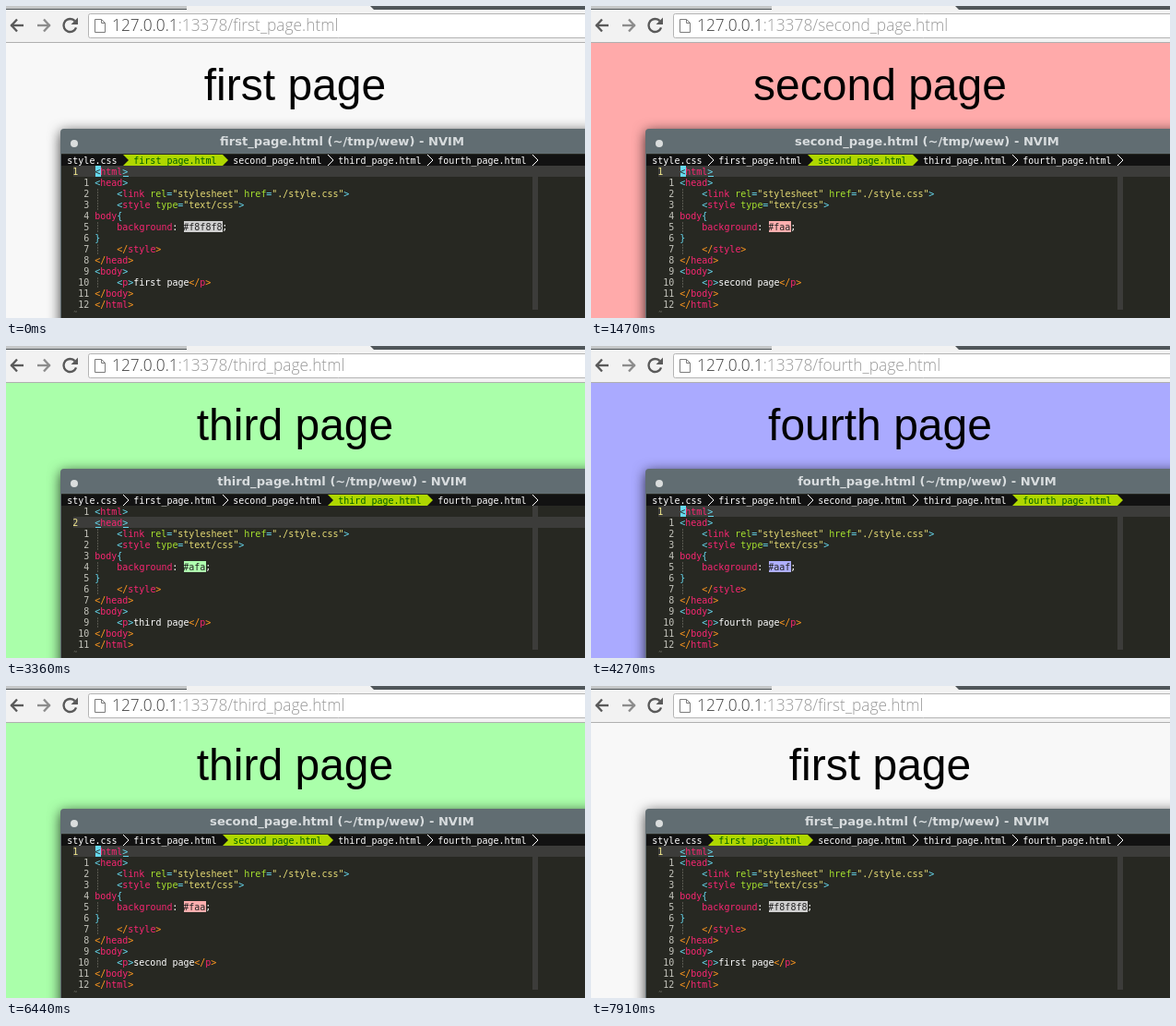
Animation of 628 by 338 pixels, one loop 8 s. Source, as an HTML page with a canvas:

```html
<!DOCTYPE html>
<html lang="en">
<head>
<meta charset="utf-8">
<title>Browser following the editor</title>
<style>
  html, body { margin: 0; width: 100%; height: 100%; overflow: hidden; }
  canvas { display: block; }
</style>
</head>
<body>
<canvas id="stage" width="628" height="338"></canvas>
<script>
const ctx = document.getElementById('stage').getContext('2d');
const W = 628, H = 338, LOOP = 8000, STEP = 70;

const PAGES = [
  { name: 'first', bg: '#f8f8f8', swatch: '#d0d0d0', line: 0 },
  { name: 'second', bg: '#faa', swatch: '#ffafaf', line: 0 },
  { name: 'third', bg: '#afa', swatch: '#afffaf', line: 1 },
  { name: 'fourth', bg: '#aaf', swatch: '#afafff', line: 0 }
];

// Each visit: editor switches, browser starts loading, address changes,
// page appears; recheck is when the stop button flashes once more.
const VISITS = [
  { page: 0, edit: 0, start: 0, url: 0, load: 0 },
  { page: 1, edit: 1190, start: 1260, url: 1330, load: 1470 },
  { page: 2, edit: 2660, start: 2730, url: 2730, load: 2940, recheck: 3010 },
  { page: 3, edit: 3990, start: 4060, url: 4060, load: 4270, recheck: 4340 },
  { page: 2, edit: 5320, start: 5390, url: 5390, load: 5600, recheck: 5670 },
  { page: 1, edit: 6440, start: 6510, url: 6580, load: 6720, recheck: 6860 },
  { page: 0, edit: 7280, start: 7350, url: 7350, load: 7490, recheck: 7630 }
];
const CURSOR_OFF = [[280, 840], [1890, 2520], [3360, 3990], [5110, 5320], [6020, 6440], [7910, LOOP]];

const within = (t, from, to) => t >= from && t < to;
const pageAt = (t, event) => PAGES[VISITS.filter(v => v[event] <= t).pop().page];
const isLoading = t => VISITS.some(v =>
  within(t, v.start, v.load) || within(t, v.recheck, v.recheck + STEP));

// ---- drawing helpers ----
function rect(x, y, w, h, color) {
  ctx.fillStyle = color;
  ctx.fillRect(x, y, w, h);
}

function path(points, { fill, stroke, width = 1, close = false }) {
  ctx.beginPath();
  points.forEach(([x, y]) => ctx.lineTo(x, y));
  if (close) ctx.closePath();
  if (fill) { ctx.fillStyle = fill; ctx.fill(); }
  if (stroke) { ctx.strokeStyle = stroke; ctx.lineWidth = width; ctx.stroke(); }
}

function text(str, x, y, font, color, align = 'left') {
  ctx.font = font;
  ctx.fillStyle = color;
  ctx.textAlign = align;
  ctx.fillText(str, x, y);
  return ctx.measureText(str).width;
}

// ---- browser ----
const ICON = '#5a5a5a', TOOLBAR = '#f2f2f2', FRAME = '#50565a';

function arrow(tip, dir, color) {
  path([[tip, 21], [tip + 14 * dir, 21]], { stroke: color, width: 2.4 });
  path([[tip + 7 * dir, 14.5], [tip + dir, 21], [tip + 7 * dir, 27.5]], { stroke: color, width: 2.4 });
}

function octagon(radius, style) {
  const points = Array.from({ length: 8 }, (_, i) => {
    const a = (i + 0.5) * Math.PI / 4;
    return [70 + radius * Math.cos(a), 21 + radius * Math.sin(a)];
  });
  path(points, { ...style, close: true });
}

function reloadIcon() {
  ctx.beginPath();
  ctx.arc(69.5, 21, 7, 0.35, 5.5);
  ctx.strokeStyle = ICON;
  ctx.lineWidth = 2.4;
  ctx.stroke();
  path([[78, 12.5], [78, 20], [70.5, 20]], { fill: ICON });
}

function drawBrowser(t) {
  const page = pageAt(t, 'load');
  rect(0, 0, W, H, page.bg);
  text(`${page.name} page`, 313.5, 102, '48px "Liberation Sans", sans-serif', '#000', 'center');

  rect(0, 0, W, 39, TOOLBAR);
  rect(0, 0, W, 4, FRAME);
  rect(0, 0, 196, 3, '#c4c6c7');
  path([[196, 4], [196, 0], [395, 0], [399, 4]], { fill: TOOLBAR });
  rect(0, 39, W, 1, '#b0b0b0');

  ctx.beginPath();
  ctx.roundRect(89.5, 8.5, 560, 26, 2);
  ctx.fillStyle = '#fff';
  ctx.fill();
  ctx.strokeStyle = '#b4b4b4';
  ctx.lineWidth = 1;
  ctx.stroke();

  arrow(5, 1, ICON);
  arrow(48, -1, '#8c8c8c');
  if (isLoading(t)) {
    octagon(8.2, { stroke: ICON, width: 1.6 });
    octagon(6, { fill: ICON });
  } else {
    reloadIcon();
  }

  path([[96.5, 14.5], [103.5, 14.5], [107.5, 18.5], [107.5, 28.5], [96.5, 28.5]],
    { fill: '#fff', stroke: '#7c7c7c', close: true });
  path([[103.5, 14.5], [103.5, 18.5], [107.5, 18.5]], { stroke: '#7c7c7c' });

  const font = '300 17.33px "Open Sans", sans-serif';
  const hostWidth = text('127.0.0.1', 115, 27, font, '#444');
  text(`:13378/${pageAt(t, 'url').name}_page.html`, 115 + hostWidth, 27, font, '#999');
}

// ---- editor ----
const CELL_W = 6, CELL_H = 12, LEFT = 61, TOP = 161, NUMBER_COL = 2, CODE_COL = 6;
const MONO = '10px "DejaVu Sans Mono", monospace';
const BG = '#272822', HIGHLIGHT = '#3c3c3a', TAB_BG = '#121212', LIME = '#afd700';
const CYAN = '#66d9ef', PINK = '#f92672', ORANGE = '#fd971f', GREEN = '#a6e22e';
const YELLOW = '#e6db74', WHITE = '#fff', DIM = '#66665e';

const colX = col => LEFT + col * CELL_W;
const rowY = row => TOP + row * CELL_H;
const put = (str, col, row, color) => text(str, colX(col) - 0.7, rowY(row) + 10, MONO, color);

const open = (tag, ...attrs) => [[CYAN, '<'], [PINK, tag], ...attrs.flat(), [CYAN, '>']];
const close = tag => [[ORANGE, '</'], [PINK, tag], [ORANGE, '>']];
const attr = (name, value) => [[GREEN, ` ${name}`], [CYAN, '='], [YELLOW, `"${value}"`]];
const indent = parts => [[DIM, '┊'], [WHITE, '   '], ...parts];

const codeFor = page => [
  open('html'),
  open('head'),
  indent(open('link', attr('rel', 'stylesheet'), attr('href', './style.css'))),
  indent(open('style', attr('type', 'text/css'))),
  [[PINK, 'body'], [CYAN, '{']],
  indent([[PINK, 'background'], [WHITE, ': '], ['#222', page.bg, page.swatch], [WHITE, ';']]),
  [[CYAN, '}']],
  indent(close('style')),
  close('head'),
  open('body'),
  indent([...open('p'), [WHITE, `${page.name} page`], ...close('p')]),
  close('body'),
  close('html')
];

function drawTabs(page) {
  rect(60, TOP, W - 60, CELL_H, TAB_BG);
  const active = `${page.name}_page.html`;
  const tabs = ['style.css', ...PAGES.map(p => `${p.name}_page.html`)];
  let col = 0;
  tabs.forEach((tab, i) => {
    const isActive = tab === active, beforeActive = tabs[i + 1] === active;
    const end = col + tab.length + 2;
    if (isActive) rect(colX(col), TOP, (end - col) * CELL_W, CELL_H, LIME);
    put(tab, col + 1, 0, isActive ? '#005f00' : WHITE);

    const x = colX(end), edge = [[x, TOP], [x + CELL_W, TOP + CELL_H / 2], [x, TOP + CELL_H]];
    if (beforeActive) rect(x, TOP, CELL_W, CELL_H, LIME);
    if (isActive || beforeActive) path(edge, { fill: isActive ? LIME : TAB_BG });
    else path(edge, { stroke: WHITE });
    col = end + 1;
  });
}

function drawCode(page, cursorOn) {
  const lines = codeFor(page);
  rect(colX(CODE_COL + 79), rowY(1), CELL_W, lines.length * CELL_H, HIGHLIGHT);
  rect(colX(NUMBER_COL), rowY(page.line + 1), W, CELL_H, HIGHLIGHT);

  lines.forEach((parts, i) => {
    const row = i + 1, current = i === page.line;
    if (current) put(String(row), NUMBER_COL, row, '#f0e68c');
    else {
      const distance = String(Math.abs(i - page.line));
      put(distance, CODE_COL - 1 - distance.length, row, '#c4c4bc');
    }
    let col = CODE_COL;
    for (const [color, str, back] of parts) {
      if (back) rect(colX(col), rowY(row), str.length * CELL_W, CELL_H, back);
      put(str, col, row, color);
      if (current && color === CYAN) rect(colX(col), rowY(row) + 11, CELL_W, 1, CYAN);
      col += str.length;
    }
    if (current && cursorOn) {
      rect(colX(CODE_COL), rowY(row), CELL_W, CELL_H, CYAN);
      put('<', CODE_COL, row, BG);
    }
  });
  put('˜', NUMBER_COL, lines.length + 1, DIM);
}

function drawEditor(t) {
  const page = pageAt(t, 'edit');
  ctx.save();
  ctx.shadowColor = 'rgba(0,0,0,.75)';
  ctx.shadowBlur = 14;
  ctx.shadowOffsetY = 3;
  ctx.beginPath();
  ctx.roundRect(59, 133, 620, 260, 4);
  ctx.fillStyle = '#616d72';
  ctx.fill();
  ctx.restore();

  ctx.beginPath();
  ctx.arc(74, 149, 4, 0, 2 * Math.PI);
  ctx.fillStyle = '#dadddd';
  ctx.fill();
  text(`${page.name}_page.html (~/tmp/wew) - NVIM`, 364.5, 151,
    'bold 13.1px "DejaVu Sans", sans-serif', '#d8dcde', 'center');

  rect(60, 160, W, H, BG);
  drawCode(page, !CURSOR_OFF.some(([from, to]) => within(t, from, to)));
  drawTabs(page);
}

function frame() {
  const t = performance.now() % LOOP;
  drawBrowser(t);
  drawEditor(t);
  requestAnimationFrame(frame);
}
frame();
</script>
</body>
</html>
```
